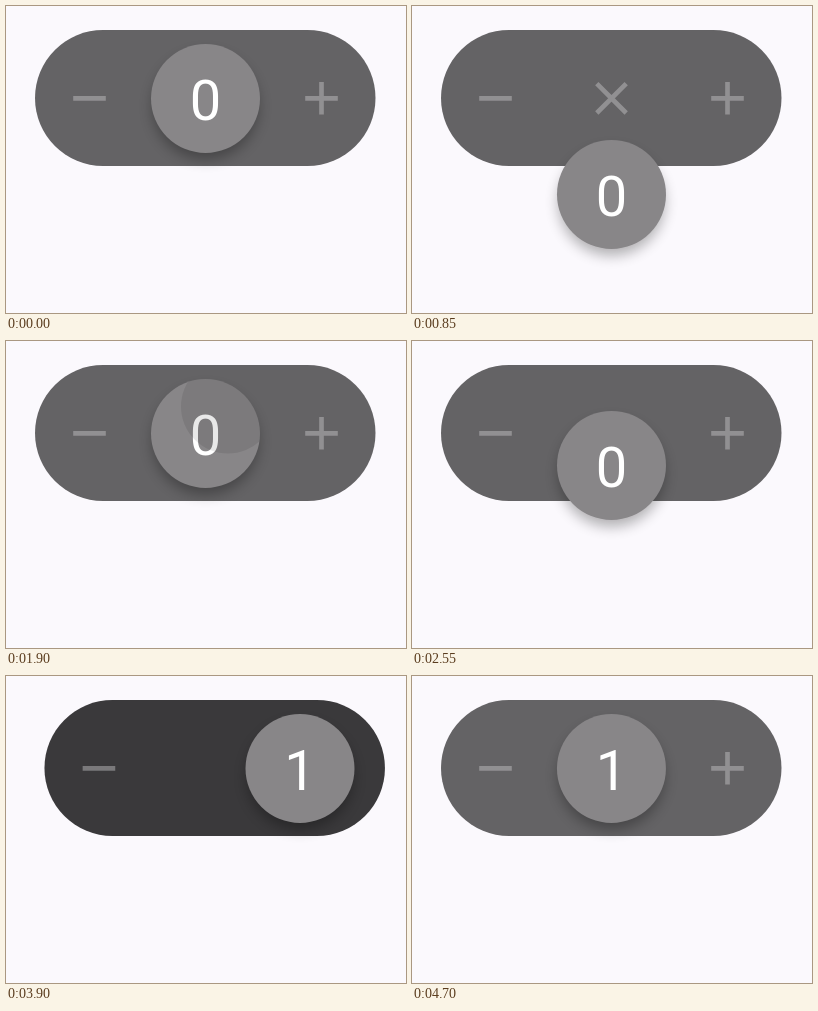
Recreate the animation shown at these times as an HTML page. Size 400x307 px, loop 4800 ms.

```html
<!DOCTYPE html>
<html lang="en">
<head>
<meta charset="utf-8">
<title>Stepper</title>
<style>
  html, body { margin: 0; width: 100%; height: 100%; overflow: hidden; background: #fbf9fd; }
  svg { display: block; width: 100vw; height: 100vh; }
  text { font: 400 56px Roboto, sans-serif; fill: #fff; text-anchor: middle; }
</style>
</head>
<body>
<svg viewBox="0 0 400 307">
  <defs>
    <filter id="blur" x="-50%" y="-50%" width="200%" height="200%">
      <feGaussianBlur stdDeviation="7"/>
    </filter>
    <clipPath id="disc"><circle r="54.5"/></clipPath>
  </defs>
  <g id="bar">
    <rect id="pill" x="29" y="24" width="340.5" height="136" rx="68"/>
    <g id="icons" fill="none" stroke-width="4.67">
      <path d="M67.2 92.3h32.6M299.2 92.3h32.6M315.5 76v32.6"/>
      <path id="cross" d="M184.8 77.6l29.4 29.4M214.2 77.6l-29.4 29.4"/>
    </g>
  </g>
  <g id="ball">
    <circle cy="8" r="53" fill="#000" opacity=".3" filter="url(#blur)"/>
    <circle r="54.5" fill="#888688"/>
    <text id="digit" y="21.5">0</text>
    <g clip-path="url(#disc)"><circle id="ripple" cx="22.5" cy="-27"/></g>
  </g>
</svg>
<script>
const LOOP = 4800;
const $ = id => document.getElementById(id);
const pill = $('pill'), icons = $('icons'), cross = $('cross'), bar = $('bar');
const ball = $('ball'), digit = $('digit'), ripple = $('ripple');

const DRAGS = [
  { press: 100, release: 847, dx: 0, dy: 96 },
  { press: 1900, release: 2447, dx: 0, dy: 96 },
  { press: 3400, release: 3940, dx: 94.5, dy: 0 }
];
const COUNT_AT = 3700;

const clamp = v => Math.min(1, Math.max(0, v));
const mix = (a, b, k) => a + (b - a) * k;
const gray = v => `rgb(${v},${v - 1.5},${v + 0.5})`;
const ease = k => (1 - Math.cos(Math.PI * clamp(k))) / 2;

// Underdamped spring: mass 0.9, stiffness 250, damping ratio 0.6
function spring(sec) {
  const w = Math.sqrt(250 / 0.9), z = 0.6, wd = w * Math.sqrt(1 - z * z);
  return Math.exp(-z * w * sec) * (Math.cos(wd * sec) + z * w / wd * Math.sin(wd * sec));
}

function pull(drag, t) {
  return t < drag.release
    ? ease((t - drag.press - 20) / 470)
    : spring((t - drag.release) / 1000);
}

function draw(t) {
  const drag = DRAGS.filter(d => t >= d.press).pop();
  const k = drag ? pull(drag, t) : 0;
  const x = drag ? drag.dx * k : 0;
  const y = drag ? drag.dy * k : 0;
  const dark = clamp(x / 94.5);

  bar.setAttribute('transform', `translate(${x * 0.1} 0)`);
  pill.setAttribute('fill', gray(mix(100, 58, dark)));
  icons.setAttribute('stroke', gray(mix(145, 122, dark)));
  cross.setAttribute('opacity', clamp(y / 90));
  ball.setAttribute('transform', `translate(${199.5 + x} ${92.5 + y})`);
  digit.textContent = t < COUNT_AT ? '0' : '1';

  const age = drag ? t - drag.press : LOOP;
  ripple.setAttribute('r', mix(47, 112, clamp(age / 250)));
  ripple.setAttribute('opacity', 0.09 * (1 - clamp((age - 100) / 250)));
}

let start;
function tick(now) {
  if (start === undefined) start = now;
  draw((now - start) % LOOP);
  requestAnimationFrame(tick);
}
draw(0);
requestAnimationFrame(tick);
</script>
</body>
</html>
```
